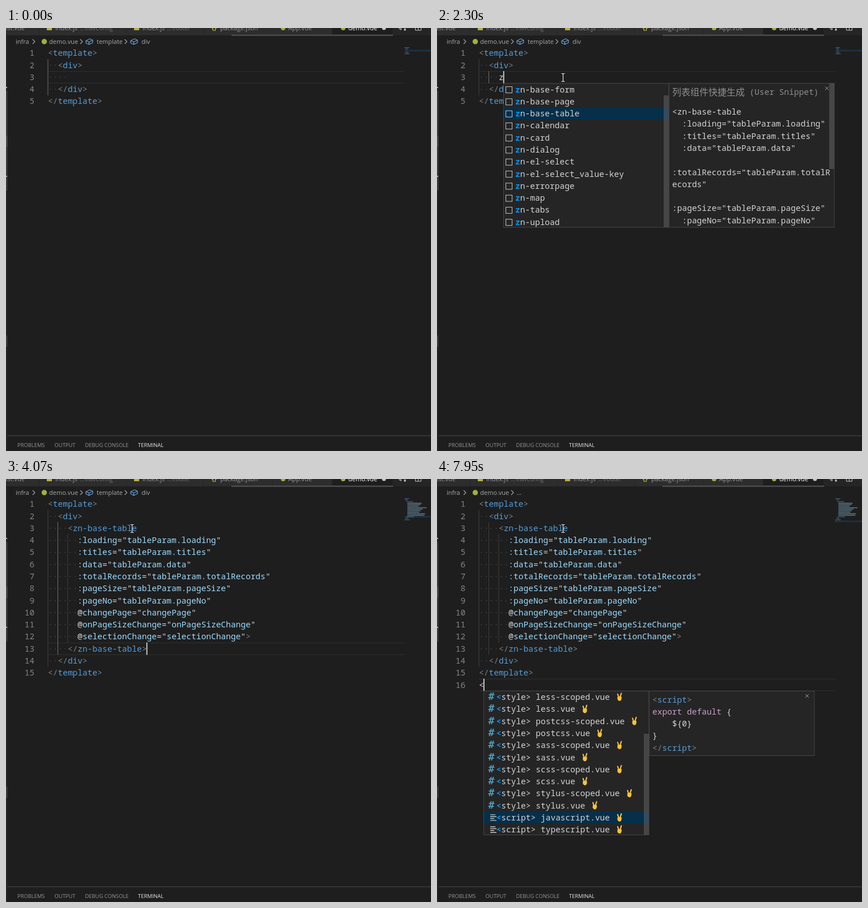
These frames come from a looping animation (750 by 747 pixels, 8 s). An HTML page with a canvas:

```html
<!DOCTYPE html>
<html lang="en">
<head>
<meta charset="utf-8">
<style>
html, body { margin: 0; width: 100%; height: 100%; overflow: hidden; background: #1e1e1e; }
canvas { display: block; }
</style>
</head>
<body>
<canvas id="stage" width="750" height="747"></canvas>
<script>
const ctx = document.getElementById('stage').getContext('2d');
const LOOP = 8000, LINE = 21.28, CHAR = 8.727, LEFT = 74, TOP = 33.7;
const MONO_FACE = '14.545px "Noto Sans Mono", monospace';
const MONO = '500 ' + MONO_FACE, MONO_BOLD = 'bold ' + MONO_FACE;
const UI = '11px "Open Sans", sans-serif';
const LIGHT = '#d4d4d4', GRAY = '#808080', BLUE = '#569cd6', ATTR = '#9cdcfe', OLIVE = '#a0b040';
const THUMB = 'rgba(121, 121, 121, .4)';

const empty = ['<template>', '  <div>', '    ', '  </div>', '</template>'];
const snippet = `    <zn-base-table
      :loading="tableParam.loading"
      :titles="tableParam.titles"
      :data="tableParam.data"
      :totalRecords="tableParam.totalRecords"
      :pageSize="tableParam.pageSize"
      :pageNo="tableParam.pageNo"
      @changePage="changePage"
      @onPageSizeChange="onPageSizeChange"
      @selectionChange="selectionChange">
    </zn-base-table>`.split('\n');
const withLine3 = (...lines) => [...empty.slice(0, 2), ...lines, ...empty.slice(3)];
const filled = withLine3(...snippet);

const components = ('base-form base-page base-table calendar card dialog el-select ' +
  'el-select_value-key errorpage map tabs upload').split(' ').map(n => 'zn-' + n);
const preview = ['<zn-base-table', '  :loading="tableParam.loading"', '  :titles="tableParam.titles"',
  '  :data="tableParam.data"', '', ':totalRecords="tableParam.totalR', 'ecords"', '',
  ':pageSize="tableParam.pageSize"', '  :pageNo="tableParam.pageNo"'];
const blocks = [
  ...['less', 'postcss', 'sass', 'scss', 'stylus'].flatMap(n => [`<style> ${n}-scoped.vue`, `<style> ${n}.vue`]),
  '<script> javascript.vue', '<script> typescript.vue'];

// time, caret line, caret column, document, breadcrumb depth
const states = [
  [0, 3, 4, empty, 2],
  [2220, 3, 5, withLine3('    z'), 2],
  [2370, 3, 6, withLine3('    zn'), 2],
  [3990, 13, 20, filled, 2],
  [4370, 13, 20, filled, 3],
  [6010, 14, 8, filled, 3],
  [6160, 15, 11, filled, 3],
  [6310, 15, 11, filled, 1],
  [7160, 16, 0, [...filled, ''], 1],
  [7560, 16, 0, [...filled, ''], 0],
  [7860, 16, 1, [...filled, '<'], 0]
];
// time, opacity reached, fade length
const blinks = [[0, 0, 1], [290, 1, 150], [900, 0, 150], [1440, 1, 150], [2990, 0, 80], [3600, 1, 80],
  [4690, 0, 150], [5310, 1, 80], [5690, 0, 150], [6010, 1, 1], [6780, 0, 150], [7160, 1, 1]];
const mousePath = [[290, 472, 417], [450, 420, 330], [620, 330, 190], [780, 258, 95], [900, 222, 75],
  [1060, 202, 82], [1140, 213, 89], [1210, 222.5, 87.5]];

const latest = (list, t) => list.filter(item => item[0] <= t).pop();

function rect(x, y, w, h, color) {
  ctx.fillStyle = color;
  ctx.fillRect(x, y, w, h);
}
function circle(x, y, r, color) {
  ctx.fillStyle = color;
  ctx.beginPath();
  ctx.arc(x, y, r, 0, 7);
  ctx.fill();
}
function frame(x, y, w, h, color) {
  ctx.strokeStyle = color;
  ctx.lineWidth = 1;
  ctx.strokeRect(x, y, w, h);
}
function path(d, x, y, color, width = 1) {
  ctx.save();
  ctx.translate(x, y);
  ctx.strokeStyle = color;
  ctx.lineWidth = width;
  ctx.stroke(new Path2D(d));
  ctx.restore();
}
function text(str, x, y, color, font = UI, align = 'left') {
  ctx.font = font;
  ctx.fillStyle = color;
  ctx.textAlign = align;
  ctx.fillText(str, x, y);
}
const mono = (str, x, y, color = LIGHT) => text(str, x, y, color, MONO);

// Splits a line into [column, string, color] tokens.
function tokens(line) {
  const result = [];
  for (const m of line.matchAll(/(<\/?)([\w-]*)|>|[":@=]|[^<>":@=\s]+/g)) {
    if (m[1]) {
      result.push([m.index, m[1], m[2] ? GRAY : LIGHT]);
      if (m[2]) result.push([m.index + m[1].length, m[2], BLUE]);
    } else {
      const color = m[0] === '>' ? GRAY : /["@=]/.test(m[0]) ? LIGHT : /[:@]/.test(line) ? ATTR : LIGHT;
      result.push([m.index, m[0], color]);
    }
  }
  return result;
}
function code(line, x, y) {
  for (const [col, str, color] of tokens(line)) mono(str, x + col * CHAR, y, color);
}

function drawTabs() {
  rect(0, 0, 750, 13, '#252526');
  [[0, 58], [59, 212], [213, 348], [349, 469], [470, 575]].forEach(([a, b]) => rect(a, 0, b - a, 13, '#2d2d2d'));
  rect(576, 0, 106, 13, '#1e1e1e');
  rect(398, 11.5, 285, 2.5, '#4b4b4b');
  const dim = '#969696', y = 4;
  text('list.vue', 33, y, dim, UI, 'right');
  for (const [x, folder] of [[72, 'navConfig'], [226, 'router']]) {
    rect(x, -5, 9, 9, '#b5b13f');
    text('index.js', x + 15, y, dim);
    text('...\\' + folder, x + 58, y, '#707070', '10px "Open Sans", sans-serif');
  }
  text('{}', 363, y, '#b5b13f', 'bold 11px "Open Sans", sans-serif');
  text('package.json', 378, y, dim);
  circle(489, 0, 4, OLIVE);
  text('App.vue', 498, y, dim);
  circle(595, 0, 4, OLIVE);
  text('demo.vue', 604, y, '#ffffff');
  circle(667, 0, 3.5, '#c5c5c5');
  path('M0 0V2H4M2 0L4 2L2 4M10 0V4', 694, 0, '#c5c5c5');
  circle(704, 3, 1.8, '#c5c5c5');
  path('M0 -6H10V4H0ZM5 -6V4', 722.5, 0, '#c5c5c5');
}

function drawBreadcrumb(depth) {
  const color = '#a9a9a9', y = 28;
  const chevron = x => path('M-2 -4L2 0L-2 4', x, 24, color, 1.1);
  text('infra', 17, y, color);
  chevron(49);
  circle(67.5, 24, 4.7, OLIVE);
  text('demo.vue', 76, y, color);
  chevron(133);
  if (!depth) text('...', 140.5, y, color);
  [['template', 141], ['div', 220], ['zn-base-table', 268]].slice(0, depth).forEach(([name, x], i) => {
    if (i) chevron(x - 8.5);
    path('M0 -1.5L7 -5L12 -2.5V2L5.5 5L0 2.5ZM0 -1.5L5.5 .5L12 -2.5M5.5 .5V5', x, 24, '#75beff');
    text(name, x + 19, y, color);
  });
}

function drawChrome() {
  rect(0, 14, 2.5, 733, '#252526');
  rect(0, 111, 2.5, 176, '#3c3c3c');
  rect(0, 190, 2.5, 20, '#4c4c4c');
  rect(0, 543, 2.5, 20, '#3c3c3c');
  rect(0, 104, 2, 2, '#b0b0b0');
  rect(0, 261, 2, 2, '#b0b0b0');
  rect(2.5, 719.5, 748, 1, '#484848');
  [['PROBLEMS', 20], ['OUTPUT', 85.5], ['DEBUG CONSOLE', 139.5], ['TERMINAL', 233]].forEach(([name, x], i) =>
    text(name, x, 739.8, i === 3 ? '#e7e7e7' : '#969696', '9.4px "Open Sans", sans-serif'));
}

function drawMinimap(lines, row) {
  const y = n => 34 + n * 2.66;
  rect(703, y(row - 1) - .5, 47, 2.6, '#1c3247');
  ctx.globalAlpha = .5;
  lines.forEach((line, i) => tokens(line).forEach(([col, str, color]) =>
    rect(703 + col * .87, y(i), str.length * .87, 1.5, color)));
  ctx.globalAlpha = 1;
}

function drawEditor(lines, row, col, t) {
  const lineTop = n => TOP + (n - 1) * LINE;
  rect(LEFT, lineTop(row) - .3, 629, 1.4, '#2b2b2b');
  rect(LEFT, lineTop(row + 1) - .9, 629, 1.4, '#2b2b2b');

  const last = lines.length > 5 ? 14 : 4;
  const guide = (c, from, to, active) =>
    rect(LEFT - .5 + c * CHAR, lineTop(from), 1, (to - from + 1) * LINE, active ? '#707070' : '#404040');
  guide(0, 2, last, t < 2220 || row === 14);
  if (t >= 2220) guide(2, 3, last - 1, row < 14);
  if (last > 4) guide(4, 4, 12, false);

  lines.forEach((line, i) => {
    const y = lineTop(i + 1) + 15.6;
    text(i + 1, 50.3, y, '#858585', MONO, 'right');
    for (let c = 0; c < line.match(/^ */)[0].length; c++)
      rect(LEFT + (c + .5) * CHAR - .8, y - 5.6, 1.6, 1.6, '#444444');
    code(line, LEFT, y);
  });

  if (t >= 4140 && row < 16) {
    const start = lines[row - 1].indexOf('<');
    for (const c of [start, col - 1]) frame(LEFT + c * CHAR, lineTop(row) + .8, CHAR - .5, LINE - 2, '#7c8a7c');
  }
  const [from, target, fade] = latest(blinks, t), p = Math.min(1, (t - from) / fade);
  ctx.globalAlpha = target ? p : 1 - p;
  rect(LEFT - .8 + col * CHAR, lineTop(row) - .2, 1.7, LINE + .4, '#e0e0e0');
  ctx.globalAlpha = 1;
}

function drawList(x, y, count, selected, thumbTop, drawRow) {
  rect(x, y, 292, 254.5, '#252526');
  rect(x, y + selected * LINE, 292, LINE, '#062f4a');
  rect(x + 283, thumbTop, 9, y + 254 - thumbTop, THUMB);
  for (let i = 0; i < count; i++) drawRow(i, y + i * LINE + 15.6);
  frame(x + .5, y, 291.5, 254, '#454545');
}
function drawDetails(x, y, height) {
  rect(x, y, 292, height, '#252526');
  frame(x + .5, y, 291.5, height, '#454545');
  path('M-3 -3L3 3M3 -3L-3 3', x + 279, y + 8.5, '#a0a0a0');
}

function drawComponentPopup(typed, t) {
  const x = 108.3 + typed * CHAR, y = 98, side = x + 292;
  drawList(x, y, 12, 2, 119, (i, base) => {
    frame(x + 4.5, base - 10, 11, 11, '#c5c5c5');
    const name = components[i];
    text(name.slice(0, typed), x + 21, base, '#0097fb', MONO_BOLD);
    mono(name.slice(typed), x + 21 + typed * CHAR, base);
  });
  drawDetails(side, y, 254);
  if (t < 3450) rect(side + 283, y, 9, 151, THUMB);
  text('列表组件快捷生成', side + 6, 118.5, '#8f8f8f', '16px "Noto Sans CJK SC", "Noto Sans CJK", sans-serif');
  mono('(User Snippet)', side + 142.5, 118, '#8f8f8f');
  preview.forEach((line, i) => mono(line, side + 6, 153.2 + i * LINE));
}

function drawVictoryHand(x, y) {
  const color = '#f5c33b';
  path('M5 9L2.6 2M7 9L9.6 .5', x, y, color, 2.1);
  ctx.fillStyle = color;
  ctx.fill(new Path2D('M2.5 8Q6 5.5 10 8L9.5 12Q8.5 15 6 15Q3.5 14.5 2.5 12Z'), 'nonzero');
}
function drawHandAt(x, y) {
  ctx.save();
  ctx.translate(x, y);
  drawVictoryHand(0, 0);
  ctx.restore();
}

function drawBlockPopup() {
  const x = 82, y = 374.5;
  drawList(x, y, 12, 10, 450, (i, base) => {
    const name = blocks[i];
    if (i < 10) text('#', x + 8.5, base, '#519aba', 'bold 18px "DejaVu Sans Mono", monospace');
    else path('M0 -10H9M0 -6.7H11M0 -3.4H7M0 0H11', x + 12, base, '#c5c5c5', 1.4);
    text('<', x + 22.5, base, '#0097fb', MONO_BOLD);
    mono(name.slice(1), x + 22.5 + CHAR, base);
    drawHandAt(x + 24.5 + (name.length + 1) * CHAR, base - 13);
  });
  drawDetails(374, y, 114);
  const base = n => 394.5 + n * LINE;
  code('<script>', 380, base(0));
  mono('export default', 380, base(1), '#c9a0c6');
  mono('{', 380 + 15 * CHAR, base(1));
  mono('${0}', 380 + 4 * CHAR, base(2));
  mono('}', 380, base(3));
  code('<\/script>', 380, base(4));
}

function drawMouse(t) {
  if (t < mousePath[0][0]) return;
  const a = latest(mousePath, t), b = mousePath[mousePath.indexOf(a) + 1] || a;
  const p = a === b ? 0 : (t - a[0]) / (b[0] - a[0]);
  path('M-3 -7H-1L0 -6L1 -7H3M0 -6V6M-3 7H-1L0 6L1 7H3',
    a[1] + (b[1] - a[1]) * p, a[2] + (b[2] - a[2]) * p, '#e6e6e6', 1.2);
}

function draw(t) {
  const [, row, col, lines, depth] = latest(states, t);
  rect(0, 0, 750, 747, '#1e1e1e');
  drawChrome();
  drawTabs();
  drawBreadcrumb(depth);
  drawEditor(lines, row, col, t);
  drawMinimap(lines, row);
  if (t >= 2300 && t < 3990) drawComponentPopup(t < 2370 ? 1 : 2, t);
  if (t >= 7950) drawBlockPopup();
  drawMouse(t);
}

const start = performance.now();
function tick() {
  draw((performance.now() - start) % LOOP);
  requestAnimationFrame(tick);
}
tick();
</script>
</body>
</html>
```
